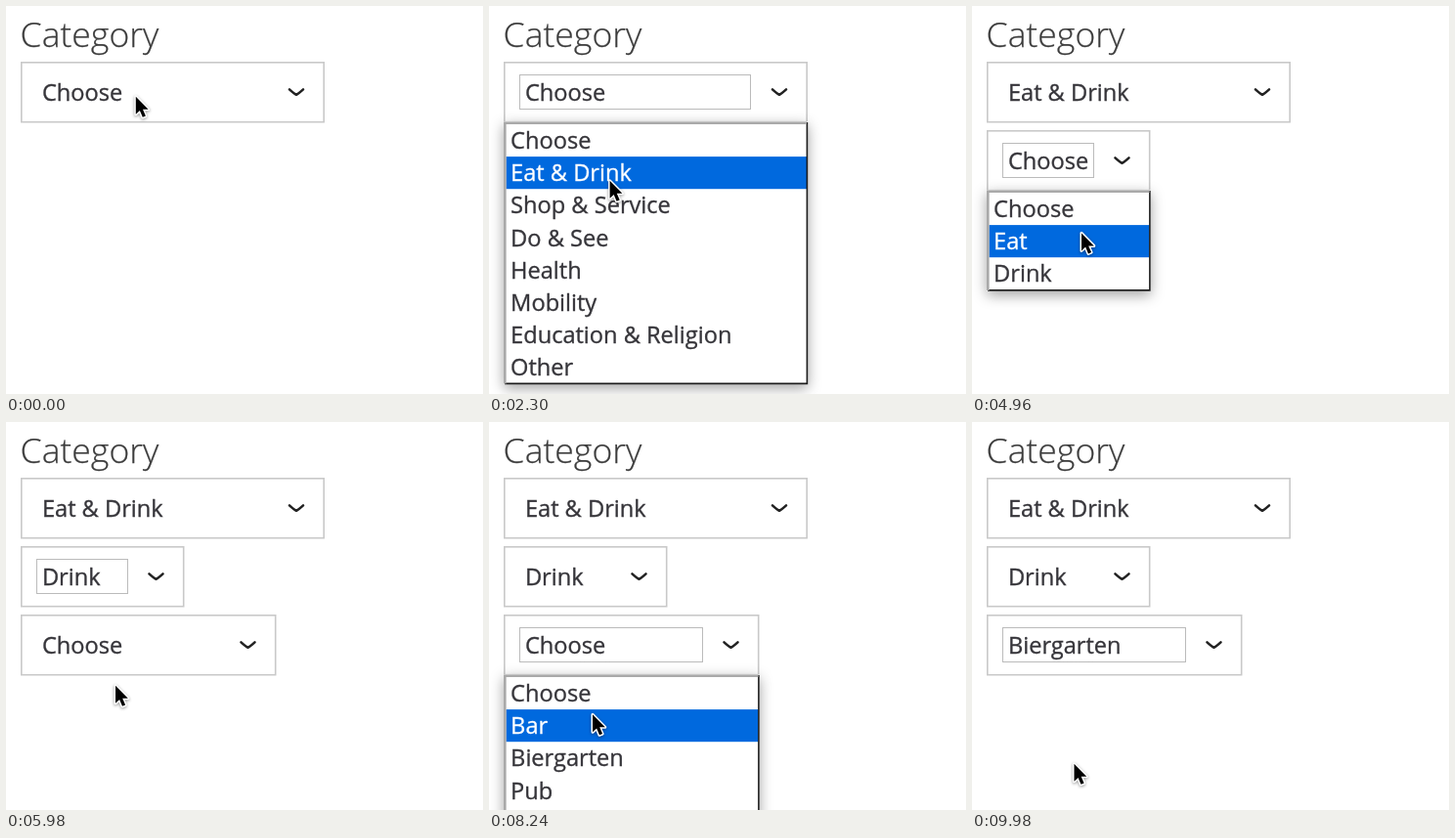
These frames come from a looping animation (488x397 px, 10000 ms). An HTML page:

```html
<!DOCTYPE html>
<html lang="en">
<head>
<meta charset="utf-8">
<title>Category select</title>
<style>
  html, body { margin: 0; width: 100%; height: 100%; overflow: hidden; background: #fff; }
  svg { display: block; width: 488px; height: 397px; }
  text { font: 400 23.6px "Open Sans", sans-serif; fill: #36353a; stroke: #36353a; stroke-width: .35; }
  .title { font-weight: 300; font-size: 35.5px; fill: #3c3c3c; stroke: #3c3c3c; stroke-width: .25; }
  .box { fill: #fff; stroke: #c9c9c9; stroke-width: 1.6; }
  .chevron { fill: none; stroke: #222; stroke-width: 2.6; stroke-linecap: round; stroke-linejoin: round; }
  .focus { fill: none; stroke: #777; stroke-dasharray: 1 1; }
  .list { filter: drop-shadow(0 4px 7px rgba(0, 0, 0, .36)); }
  .paper { fill: #fff; }
  .light { fill: none; stroke: #a9a9a9; stroke-width: 2.6; }
  .dark { fill: none; stroke: #1c1c1c; stroke-width: 1.6; }
  .bar { fill: #0069de; }
  .on { fill: #fff; stroke: #fff; }
  .cursor { filter: drop-shadow(0 1.5px 1.5px rgba(0, 0, 0, .4)); }
  .cursor path { fill: #000; stroke: #fff; stroke-width: 3; stroke-linejoin: round; paint-order: stroke; }
</style>
</head>
<body>
<svg id="stage" viewBox="0 0 488 397"></svg>
<script>
const LOOP = 10000, LEFT = 15, ROW = 33.1;

// show: select appears, open/close: its list, blur: focus moves on
const selects = [
  { top: 57, right: 326, show: 0, open: 620, close: 2400, blur: 3780, pick: 1,
    items: ["Choose", "Eat & Drink", "Shop & Service", "Do & See", "Health",
            "Mobility", "Education & Religion", "Other"] },
  { top: 127, right: 182.5, show: 2400, open: 3780, close: 5600, blur: 6760, pick: 2,
    items: ["Choose", "Eat", "Drink"] },
  { top: 197, right: 276.5, show: 5600, open: 6760, close: 8860, blur: LOOP, pick: 2,
    items: ["Choose", "Bar", "Biergarten", "Pub", "", ""] }
];

// time, x, y of the pointer tip
const moves = [
  [0, 132.8, 92.8], [1720, 132.8, 92.8], [2040, 123.6, 178.8], [4400, 123.6, 178.8],
  [4760, 112, 232.4], [5140, 112, 232.4], [5400, 112, 269.8], [6140, 112, 269.8],
  [6480, 109.5, 239], [8020, 109.5, 239], [8240, 106, 299.3], [8520, 104.5, 349.8], [LOOP, 104.5, 349.8]
];

const stage = document.getElementById("stage");

function add(parent, tag, attrs, label) {
  const el = document.createElementNS("http://www.w3.org/2000/svg", tag);
  for (const key in attrs) el.setAttribute(key, attrs[key]);
  if (label !== undefined) el.textContent = label;
  return parent.appendChild(el);
}

const visible = (el, on) => { el.style.display = on ? "" : "none"; };

function buildSelect(s) {
  const { top, right } = s, mid = right - 29;
  s.group = add(stage, "g", {});
  add(s.group, "rect", { class: "box", x: LEFT + .8, y: top + .8, width: right - LEFT - 1.6, height: 60.9 });
  s.label = add(s.group, "text", { x: 36.9, y: top + 40 });
  add(s.group, "path", { class: "chevron",
    d: `M${mid - 7} ${top + 28.4}Q${mid - 2} ${top + 33} ${mid} ${top + 33.8}Q${mid + 2} ${top + 33} ${mid + 7} ${top + 28.4}` });
  s.focus = add(s.group, "rect", { class: "focus", x: 31.5, y: top + 13.5, width: Math.round(right) - 90, height: 35 });
}

function buildList(s) {
  const { top, right, items } = s;
  const first = top + 64, height = items.length * ROW, end = first + height + .6;
  s.list = add(stage, "g", { class: "list" });
  add(s.list, "rect", { class: "paper", x: LEFT, y: first - 2.6, width: right - LEFT, height: height + 4 });
  s.bar = add(s.list, "rect", { class: "bar", x: 17.5, width: right - 18.5, height: ROW });
  add(s.list, "path", { class: "dark", d: `M${right - .6} ${first - 2}V${end}H${LEFT + 1}` });
  add(s.list, "path", { class: "light", d: `M${LEFT + 1.3} ${end}V${first - 1.3}H${right - 1}` });
  s.rows = items.map((item, i) => add(s.list, "text", { x: 22.1, y: first + 25.2 + i * ROW }, item));
}

add(stage, "text", { class: "title", x: 14.6, y: 42 }, "Category");
selects.forEach(buildSelect);
selects.forEach(buildList);
const cursor = add(stage, "g", { class: "cursor" });
add(cursor, "path", { d: "M0 0V18L4.1 14.2L7 21L10.1 19.7L7.2 13H12.8Z" });

function pointer(t) {
  const i = moves.findIndex(m => m[0] > t);
  const [t0, x0, y0] = moves[i - 1], [t1, x1, y1] = moves[i];
  const p = (t - t0) / (t1 - t0), e = p * p * (3 - 2 * p);
  return [x0 + (x1 - x0) * e, y0 + (y1 - y0) * e];
}

function draw(t) {
  const [x, y] = pointer(t);
  cursor.setAttribute("transform", `translate(${x} ${y})`);
  for (const s of selects) {
    const open = t >= s.open && t < s.close;
    visible(s.group, t >= s.show);
    visible(s.focus, t >= s.open && t < s.blur);
    visible(s.list, open);
    s.label.textContent = s.items[t >= s.close ? s.pick : 0];
    if (!open) continue;
    const first = s.top + 64;
    const hover = Math.max(0, Math.min(s.items.length - 1, Math.floor((y - first) / ROW)));
    s.bar.setAttribute("y", first + hover * ROW);
    s.rows.forEach((row, i) => row.classList.toggle("on", i === hover));
  }
}

const start = performance.now();
function tick() {
  draw((performance.now() - start) % LOOP);
  requestAnimationFrame(tick);
}
tick();
</script>
</body>
</html>
```
